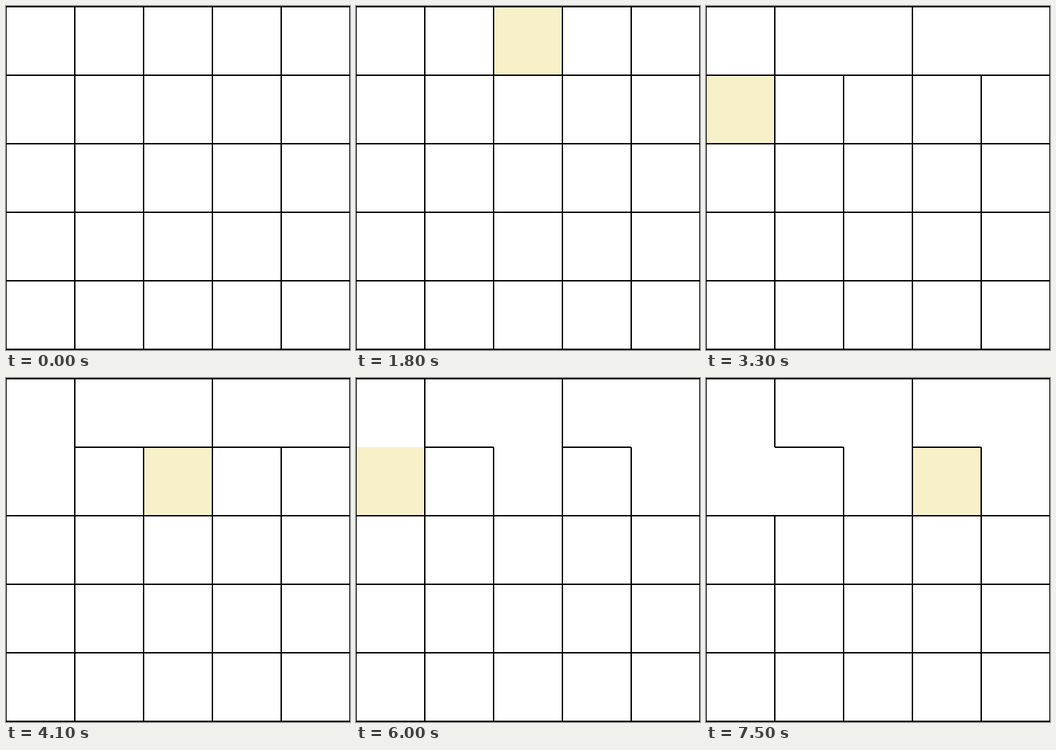
An HTML page for the animation above (8 s loop, 500 by 502 pixels).

```html
<!DOCTYPE html>
<html lang="en">
<head>
<meta charset="utf-8">
<title>Maze generation</title>
<style>
  html, body { margin: 0; width: 100%; height: 100%; overflow: hidden; background: #fff; }
  svg { display: block; }
  .walls { fill: none; stroke: #000; stroke-width: 2; }
  .cursor { fill: #f8f0c8; animation: visit 8s step-end infinite; }
  .opening { animation: 8s step-end infinite; }

  /* One cell at a time; offstage until the first visit. */
  @keyframes visit {
    0%      { transform: translate(-200px, 0); }
    6.25%   { transform: translate(0, 0); }
    12.5%   { transform: translate(100px, 0); }
    22.5%   { transform: translate(200px, 0); }
    27.5%   { transform: translate(300px, 0); }
    35%     { transform: translate(400px, 0); }
    41.25%  { transform: translate(0, 100px); }
    46.25%  { transform: translate(100px, 100px); }
    51.25%  { transform: translate(200px, 100px); }
    58.75%  { transform: translate(300px, 100px); }
    65%     { transform: translate(400px, 100px); }
    75%     { transform: translate(0, 100px); }
    81.25%  { transform: translate(100px, 100px); }
    87.5%   { transform: translate(200px, 100px); }
    93.75%, 100% { transform: translate(300px, 100px); }
  }

  /* Each wall disappears at its own moment. */
  @keyframes open1 { 0% { opacity: 1; } 27.5%, 100%  { opacity: 0; } }
  @keyframes open2 { 0% { opacity: 1; } 41.25%, 100% { opacity: 0; } }
  @keyframes open3 { 0% { opacity: 1; } 46.25%, 100% { opacity: 0; } }
  @keyframes open4 { 0% { opacity: 1; } 58.75%, 100% { opacity: 0; } }
  @keyframes open5 { 0% { opacity: 1; } 75%, 100%    { opacity: 0; } }
  @keyframes open6 { 0% { opacity: 1; } 87.5%, 100%  { opacity: 0; } }
</style>
</head>
<body>
<svg width="500" height="502" viewBox="0 0 500 502">
  <rect class="cursor" y="1" width="100" height="100"/>
  <g class="walls">
    <path d="M0 1H500M100 101h100M300 101h100M0 201H500M0 301H500M0 401H500M0 501H500"/>
    <path d="M0 1V501M100 1v100M100 201V501M200 101V501M300 1V501M400 101V501M500 1V501"/>
    <path class="opening" style="animation-name: open1" d="M200 1v100"/>
    <path class="opening" style="animation-name: open2" d="M400 1v100"/>
    <path class="opening" style="animation-name: open3" d="M0 101h100"/>
    <path class="opening" style="animation-name: open4" d="M200 101h100"/>
    <path class="opening" style="animation-name: open5" d="M400 101h100"/>
    <path class="opening" style="animation-name: open6" d="M100 101v100"/>
  </g>
</svg>
</body>
</html>
```
